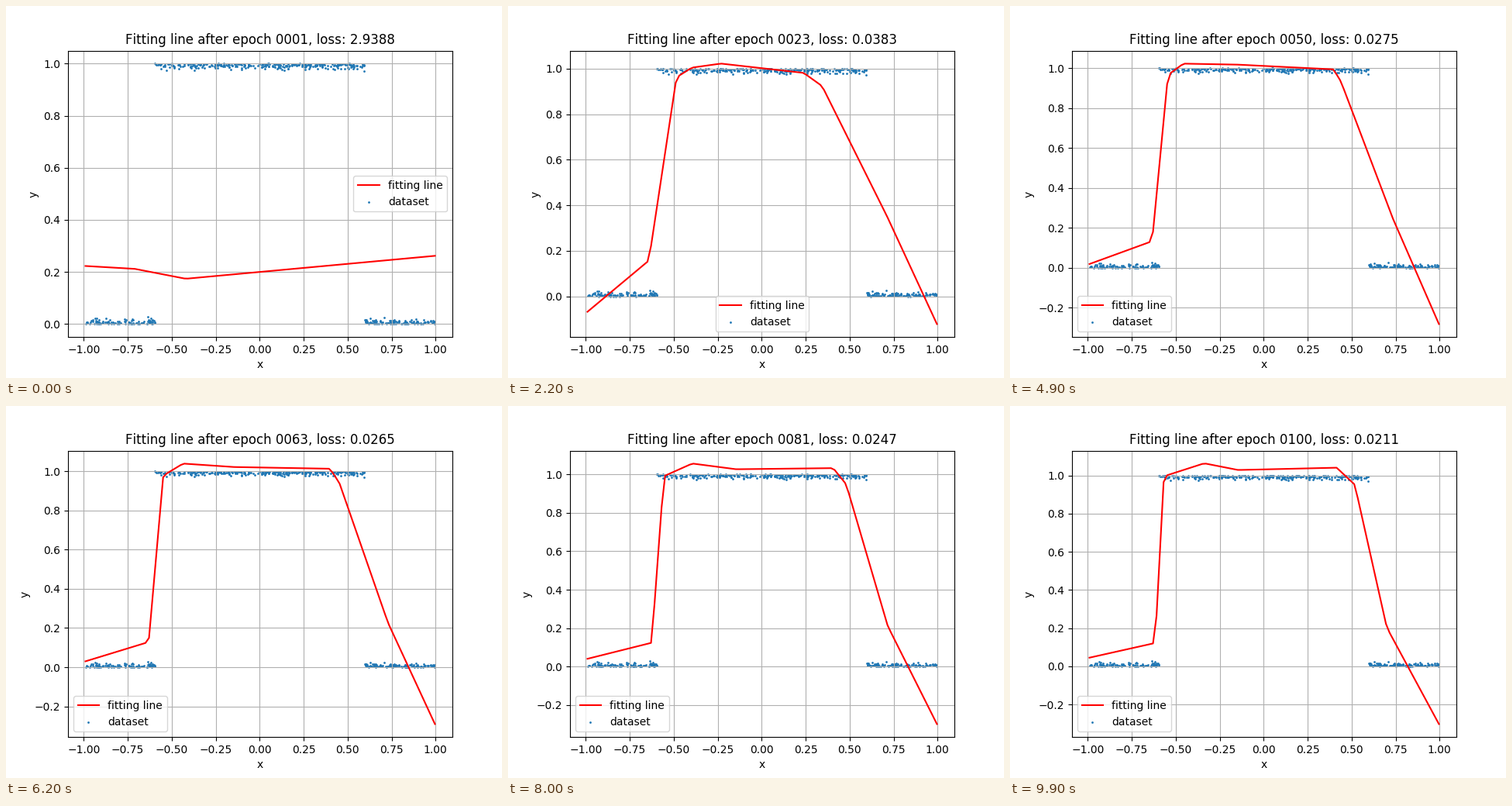
Recreate the animation shown at these times as a matplotlib script. Size 640 by 480 pixels, loop 10 s.

```python
import numpy as np
import matplotlib.pyplot as plt
from matplotlib.animation import FuncAnimation

FRAMES, INTERVAL = 100, 100
X_MIN, X_MAX = -0.9901, 0.9963
EDGE = 0.597  # half width of the top hat

plt.rcParams["text.kerning_factor"] = 6

# Noisy top hat: 1 inside the edge, 0 outside, noise pointing inwards
rng = np.random.default_rng(7)
data_x = np.append(rng.uniform(X_MIN, X_MAX, 498), [X_MIN, X_MAX])
noise = np.minimum(np.abs(rng.normal(0, 0.01, data_x.size)), 0.031)
data_y = np.where(np.abs(data_x) < EDGE, 1 - noise, noise)

# Bends of the fit: left end, foot, shoulder, peak, dip, rim, drop, kink, right end
ROUGH = np.array([(X_MIN, -.26), (-.644, .2), (-.455, 1.01), (-.36, 1.036),
                  (-.275, 1.056), (.16, 1.041), (.3, .932), (.7, .563),
                  (X_MAX, .288)])
BROAD = np.array([(X_MIN, 0), (-.636, .142), (-.541, .945), (-.47, .993),
                  (-.145, 1.01), (.395, .96), (.43, .92), (.74, .275),
                  (X_MAX, -.266)])
FINAL = np.array([(X_MIN, .045), (-.617, .122), (-.567, .996), (-.338, 1.064),
                  (-.145, 1.029), (.415, 1.041), (.518, .952), (.7, .203),
                  (X_MAX, -.303)])
ROUGH_AT, BROAD_AT, FINAL_AT = 13, 32, 100

LOSS = {1: 2.9388, 13: .0586, 32: .0299, 50: .0275, 63: .0265, 81: .0247, 100: .0211}

grid_x = np.linspace(X_MIN, X_MAX, 100)
untrained = np.interp(grid_x, [X_MIN, -.71, -.42, X_MAX], [.223, .212, .174, .262])


def ease_in(u):
    return u ** 1.7


def ease_out(u):
    return 1 - (1 - u) ** 1.8


def progress(epoch, start, end):
    return np.clip((epoch - start) / (end - start), 0, 1)


def morph(a, b, u):
    """Heights settle early while the bends slide late."""
    return a + (b - a) * [ease_in(u), ease_out(u)]


def curve(epoch):
    knots = morph(ROUGH, BROAD, progress(epoch, ROUGH_AT, BROAD_AT))
    knots = morph(knots, FINAL, progress(epoch, BROAD_AT, FINAL_AT))
    fit = np.interp(grid_x, *knots.T)
    return untrained + (fit - untrained) * ease_out(progress(epoch, 1, ROUGH_AT))


def loss(epoch):
    return np.exp(np.interp(np.log(epoch), np.log(list(LOSS)),
                            np.log(list(LOSS.values()))))


fig, ax = plt.subplots(figsize=(6.4, 4.8), dpi=100)


def draw(frame):
    epoch = frame + 1
    ax.clear()
    ax.plot(grid_x, curve(epoch), color="red", label="fitting line")
    ax.scatter(data_x, data_y, s=1, label="dataset")
    ax.set_title(f"Fitting line after epoch {epoch:04d}, loss: {loss(epoch):.4f}")
    ax.set_xlabel("x")
    ax.set_ylabel("y")
    ax.grid(True)
    ax.legend(loc="best")
    return []


anim = FuncAnimation(fig, draw, frames=FRAMES, init_func=lambda: [],
                     interval=INTERVAL, repeat=True, repeat_delay=0)
plt.show()
```
